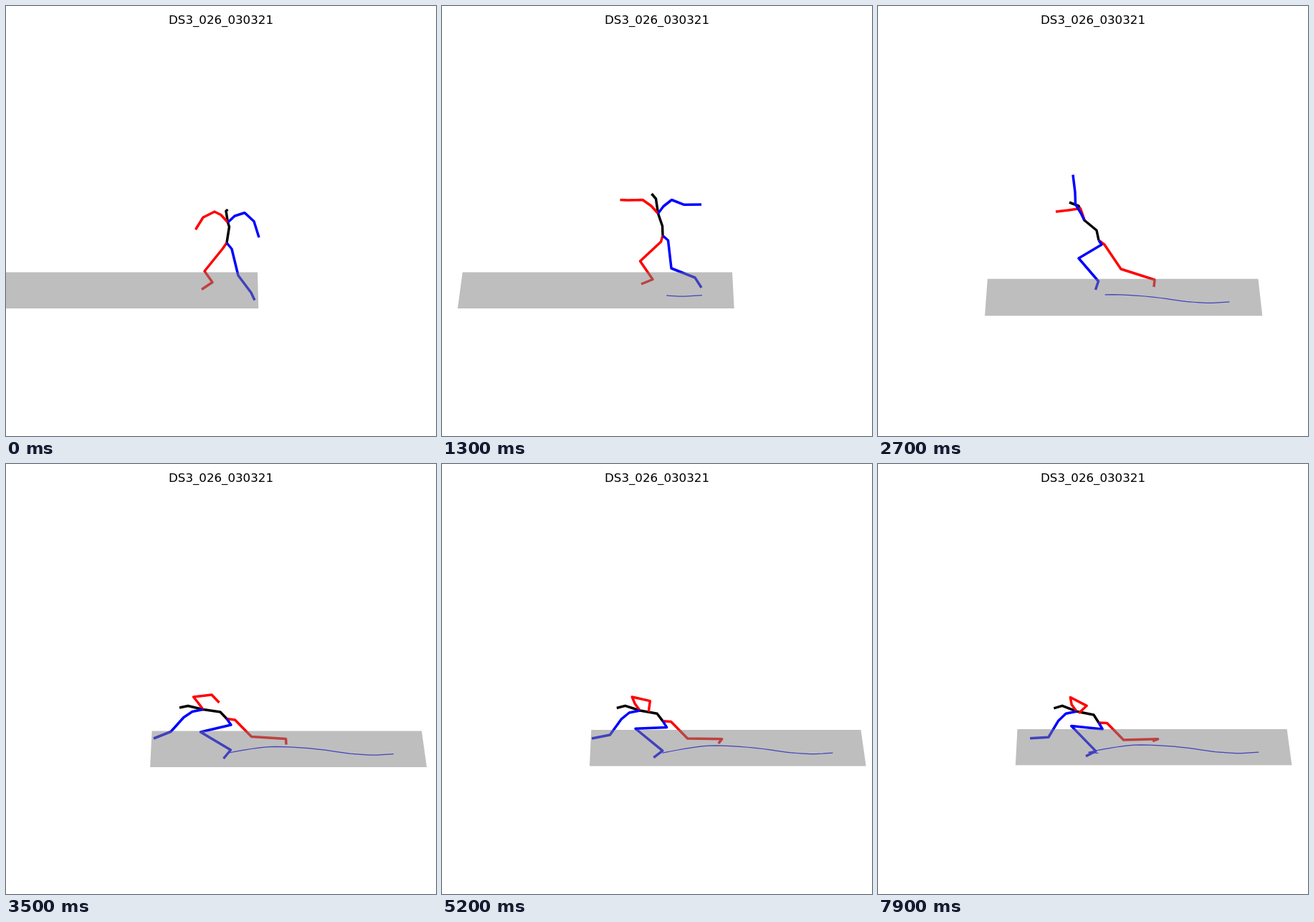
Write an HTML page with a canvas that moves like this. It is 600x600 px and loops after 8000 ms.

```html
<!DOCTYPE html>
<html lang="en">
<head>
<meta charset="utf-8">
<title>Skeleton motion</title>
<style>
  html, body { margin: 0; width: 100%; height: 100%; overflow: hidden; background: #fff; }
  canvas { display: block; width: 600px; height: 600px; }
</style>
</head>
<body>
<canvas id="stage" width="600" height="600"></canvas>
<script>
const ctx = document.getElementById('stage').getContext('2d');
const LOOP = 8000, STEP = 100, DOWN = 3500, LAST = 7900;
const ROOT_X = 308, CENTER = 300;

// Shape-preserving cubic through [time, value] keys, held outside them.
function curve(keys) {
  const n = keys.length;
  const gap = i => keys[i + 1][0] - keys[i][0];
  const secant = i => (keys[i + 1][1] - keys[i][1]) / gap(i);
  const slope = keys.map((_, i) => {
    if (i === 0) return secant(0);
    if (i === n - 1) return secant(n - 2);
    const a = secant(i - 1), b = secant(i), g = gap(i - 1), h = gap(i);
    return a * b <= 0 ? 0 : 3 * (g + h) / ((2 * h + g) / a + (h + 2 * g) / b);
  });
  return t => {
    let i = 0;
    while (i < n - 2 && t > keys[i + 1][0]) i++;
    const h = gap(i), u = Math.min(1, Math.max(0, (t - keys[i][0]) / h)), v = 1 - u;
    const rise = u * u * (3 - 2 * u);
    return keys[i][1] * (1 - rise) + keys[i + 1][1] * rise
      + h * u * v * (slope[i] * v - slope[i + 1] * u);
  };
}

// The floor slides past the root: x of its far right corner, and root depth on it.
const edgeX = curve([[0, 351], [1300, 405], [1800, 438], [2700, 530.5],
  [3500, 580], [5000, 584.6], [7900, 570.6]]);
const depth = curve([[0, 32.1], [700, 33.6], [1300, 32.1], [2500, 21.9],
  [3500, 31.1], [7900, 33.6]]);
const floorTop = t => 403.6 - depth(t);

// Limbs in order: spine, red arm, blue arm, red leg, blue leg.
const COLORS = ['#000', '#f00', '#00f', '#f00', '#00f'];
const SHOULDER = 2;
const isArm = limb => limb === 1 || limb === 2;

// Chains of joints, each after its start at the pelvis or the shoulder.
const poses = [];
function pose(time, pelvisY, ...chains) {
  const limbs = [];
  chains.forEach((xy, limb) => {
    const pts = [isArm(limb) ? limbs[0][SHOULDER] : [ROOT_X, pelvisY]];
    for (let i = 0; i < xy.length; i += 2) pts.push([xy[i], xy[i + 1]]);
    limbs.push(pts);
  });
  poses.push({ time, pelvisY, limbs });
}
// Standing
pose(0, 330.5,
  [311.5, 308, 309.5, 302, 307, 286, 309.5, 284],
  [300, 291.5, 291, 287, 275, 295, 264.5, 312],
  [319, 293, 333, 288.5, 346, 300.5, 353, 323],
  [302, 339, 277, 370, 288, 385.5, 273, 395.5],
  [315, 339, 324, 376, 342, 400, 347, 410.5]);
// Arms spread
pose(1300, 320.5,
  [307.5, 307, 301.5, 289.5, 298.5, 269, 292.5, 262],
  [292, 279, 280, 270.5, 259, 271, 248.5, 270.5],
  [309, 279.5, 320.5, 270.5, 338, 277.3, 362, 277],
  [305.5, 329, 276.5, 356, 294, 381.5, 278, 388],
  [315.5, 327, 320, 366, 353, 379, 362, 393]);
// Lunge
pose(2700, 327,
  [305, 313, 288, 299, 280, 279, 267, 274],
  [285.5, 291, 282.5, 282.5, 265, 285, 248, 287],
  [283, 289, 275.5, 276.5, 275, 260, 272, 235.5],
  [316, 333, 339, 367, 386, 382, 385, 392],
  [312, 333, 280, 352, 307.5, 384, 303.5, 396]);
// Low reach
pose(DOWN, 355.5,
  [299, 346, 275, 342.5, 254, 337.5, 242, 340],
  [268, 333, 261.5, 325, 287, 322, 297.5, 333],
  [260, 345.5, 248, 353.5, 230, 373.5, 206, 383],
  [319.5, 357, 342.5, 380.5, 390.5, 383.5, 391, 391.5],
  [314, 364, 271.5, 374, 313.5, 399, 303.5, 411]);

// Degrees each bone still turns while the low pose settles.
const TURNS = [[11, 3, 8, -5], [0, 29, 34, 90], [0, -10, -11, 18],
  [-5, 0, -5, 72], [5, 19, 15, 23]];
const SINK = 5.5;
const settle = t => Math.sin(Math.PI / 2 * Math.max(0, (t - DOWN) / (LAST - DOWN)));

const track = get => curve(poses.map((p, i) => [p.time, get(p, i)]));
const pelvisY = track(p => p.pelvisY);

// A bone turns the short way and changes length between the poses.
function bone(limb, k) {
  const vectors = poses.map(({ limbs }) => {
    const [a, b] = limbs[limb].slice(k, k + 2);
    return [b[0] - a[0], b[1] - a[1]];
  });
  let last = 0;
  const angles = vectors.map(([x, y]) => {
    const a = Math.atan2(y, x);
    last = a - 2 * Math.PI * Math.round((a - last) / (2 * Math.PI));
    return last;
  });
  return {
    length: track((p, i) => Math.hypot(...vectors[i])),
    angle: track((p, i) => angles[i]),
    turn: TURNS[limb][k] * Math.PI / 180
  };
}
const bones = TURNS.map((turns, limb) => turns.map((_, k) => bone(limb, k)));

function limbPoints(limb, [x, y], t) {
  const pts = [[x, y]];
  for (const b of bones[limb]) {
    const a = b.angle(t) + b.turn * settle(t);
    x += b.length(t) * Math.cos(a);
    y += b.length(t) * Math.sin(a);
    pts.push([x, y]);
  }
  return pts;
}

function line(pts, color, width) {
  ctx.beginPath();
  pts.forEach(p => ctx.lineTo(...p));
  ctx.strokeStyle = color;
  ctx.lineWidth = width;
  ctx.stroke();
}

function drawTrail(t) {
  const pts = [];
  for (let s = 0; s < t; s += STEP) {
    pts.push([ROOT_X + (edgeX(t) - edgeX(s)) * 1.0165, floorTop(t) + depth(s)]);
  }
  line(pts, '#00f', 1.2);
}

function drawSkeleton(t) {
  const pelvis = [ROOT_X, pelvisY(t) + SINK * settle(t)];
  const spine = limbPoints(0, pelvis, t);
  COLORS.forEach((color, limb) => {
    const start = isArm(limb) ? spine[SHOULDER] : pelvis;
    line(limbPoints(limb, start, t), color, 3.5);
  });
}

function drawFloor(t) {
  const top = floorTop(t), near = top - 371.5;
  const right = edgeX(t), left = right - 376.3 - near * 0.15;
  const bottom = top + 50.5 + near * 0.1;
  const widen = x => CENTER + (x - CENTER) * 1.0253;
  ctx.beginPath();
  ctx.moveTo(left, top);
  ctx.lineTo(right, top);
  ctx.lineTo(widen(right), bottom);
  ctx.lineTo(widen(left), bottom);
  ctx.fillStyle = 'rgba(128, 128, 128, 0.51)';
  ctx.fill();
}

function draw(t) {
  ctx.fillStyle = '#fff';
  ctx.fillRect(0, 0, 600, 600);
  drawTrail(t);
  drawSkeleton(t);
  drawFloor(t);
  ctx.fillStyle = '#000';
  ctx.fillText('DS3_026_030321', CENTER, 25);
}

ctx.lineJoin = 'round';
ctx.font = '16.67px "DejaVu Sans", sans-serif';
ctx.textAlign = 'center';

const begin = performance.now();
function tick() {
  const t = (performance.now() - begin) % LOOP;
  draw(Math.floor(t / STEP) * STEP);
  requestAnimationFrame(tick);
}
tick();
</script>
</body>
</html>
```
